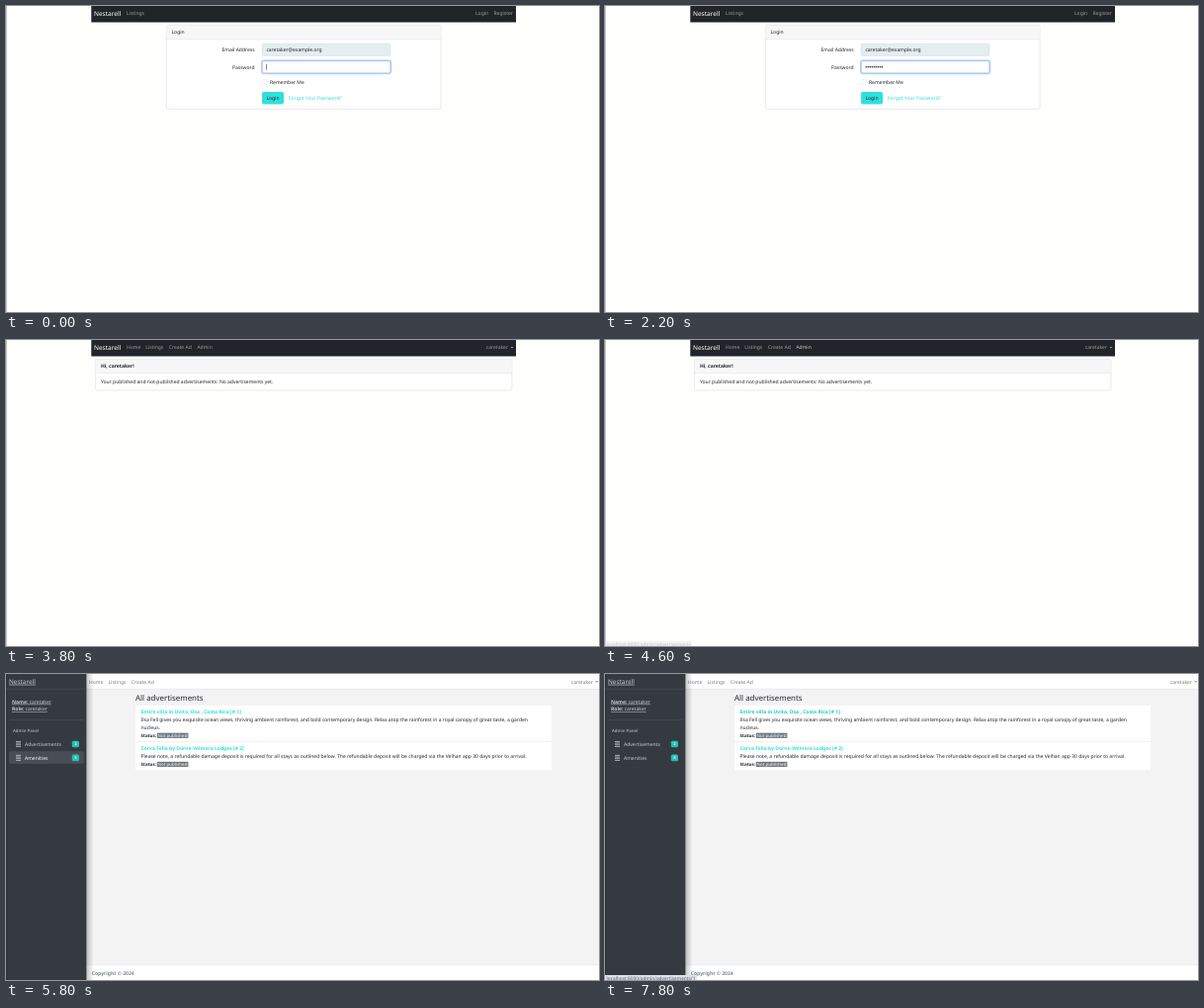
These frames come from a looping animation (600 by 310 pixels, 8000 ms). An HTML page:

```html
<!DOCTYPE html>
<html lang="en">
<head>
<meta charset="utf-8">
<title>Flat listings admin</title>
<style>
  html, body { margin: 0; width: 100%; height: 100%; overflow: hidden; background: #fefefd; }
  svg { display: block; width: 600px; height: 310px; }
  text { font: 5px "Noto Sans", "Open Sans", sans-serif; fill: #212529; text-rendering: geometricPrecision; white-space: pre; }
  .bold { font-weight: 700; }
  .mid { font-weight: 500; }
  .line { text-decoration: underline; }
</style>
</head>
<body>
<svg id="stage" viewBox="0 0 600 310"></svg>
<script>
const LOOP = 8000;
const BRAND = 'Nestarell', USER = 'caretaker';
const CYAN = '#2fe0dd', SIDE = '#c9cdd1';

const rect = (x, y, w, h, fill, more = '') =>
  `<rect x="${x}" y="${y}" width="${w}" height="${h}" fill="${fill}" ${more}/>`;

function text(x, y, str, { fill = '#212529', size = 5, cls = '', end = false } = {}) {
  return `<text x="${x}" y="${y}" class="${cls}" text-anchor="${end ? 'end' : 'start'}" ` +
    `style="fill:${fill};font-size:${size}px">${str}</text>`;
}

const caret = (x, y, fill) => `<path d="M${x - 1.5} ${y}h3l-1.5 1.6z" fill="${fill}"/>`;

function card(x, y, w, h) {
  return rect(x, y, w, h, '#fff', 'rx="1.8" stroke="#dcdcdc" stroke-width=".6"') +
    rect(x + .3, y + .3, w - .6, 13.4, '#f7f7f7', 'rx="1.4"') +
    rect(x, y + 13.7, w, .5, '#dcdcdc');
}

function statusBar(path, opacity = 1) {
  const w = 3 + path.length * 2.43;
  return `<g opacity="${opacity}">` + rect(0, 305, w, 5, '#dfe2ea') +
    text(1.5, 310.2, path, { size: 4.8, fill: '#555a66' }) + '</g>';
}

function darkNav(links) {
  return rect(0, 0, 600, 310, '#fefefd') + rect(0, 0, .8, 310, '#b4b4b4') +
    rect(86.3, 0, 429.7, 16.5, '#212529') +
    text(89, 10, BRAND, { size: 6.5, fill: '#fff' }) +
    links.map(([x, s, lit]) => text(x, 9.3, s, { fill: lit ? '#cfd1d2' : '#9b9d9f' })).join('');
}

function loginPage({ dots, cursor, pressed }) {
  const ring = (x, y, w, h, c) =>
    rect(x, y, w, h, 'none', `rx="2.4" stroke="${c}" stroke-width="1.4"`);
  let out = darkNav([[122, 'Listings'], [475, 'Login'], [493.5, 'Register']]) +
    card(162.3, 19.4, 277.7, 85) +
    text(167.5, 28, 'Login') +
    text(251.6, 46, 'Email Address', { end: true }) +
    rect(259.2, 38.2, 129.8, 12.2, '#e4edef', 'rx="1.6" stroke="#d0d8dc" stroke-width=".5"') +
    text(263.4, 46, USER + '@example.org') +
    text(251.6, 63.6, 'Password', { end: true });
  if (!pressed) out += ring(258.6, 55, 131, 13.6, '#c5dcf8');
  out += rect(259.2, 55.6, 129.8, 12.4, '#fff',
    `rx="1.6" stroke="${pressed ? '#ced4da' : '#78aee8'}" stroke-width=".7"`);
  for (let i = 0; i < dots; i++)
    out += `<circle cx="${264.3 + i * 2}" cy="61.8" r=".8" fill="#212529"/>`;
  if (cursor) out += rect(263.4 + dots * 2, 58.8, .6, 6, '#333');
  out += rect(259.4, 74.5, 5, 5, '#fff', 'rx="1" stroke="#e2e2e2" stroke-width=".5"') +
    text(267, 79, 'Remember Me');
  if (pressed) out += ring(258.6, 86.4, 23, 13.6, '#a9ece9');
  return out + rect(259, 86.9, 22, 12.5, pressed ? '#27cfca' : CYAN, 'rx="1.8"') +
    text(263.4, 95, 'Login') +
    text(286, 95, 'Forgot Your Password?', { fill: '#36d9dc' });
}

function homePage({ hover, status }) {
  return darkNav([[122, 'Home'], [141.3, 'Listings'], [164.8, 'Create Ad'], [193.4, 'Admin', hover]]) +
    text(508, 9.3, USER, { fill: '#9b9d9f', end: true }) + caret(512, 7, '#9b9d9f') +
    card(90.4, 19.4, 421.5, 31.6) +
    text(96, 28, `Hi, ${USER}!`, { cls: 'bold' }) +
    text(96, 44, 'Your published and not-published advertisements: No advertisements yet.') +
    (status ? statusBar('localhost:8000/admin/advertisements', .35) : '');
}

function menuItem(y, label, count, lit) {
  const bars = [0, 1.7, 3.4, 5.1].map(d => rect(10, y - 4.6 + d, 5, .8, '#bfc4c9')).join('');
  return (lit ? rect(3, y - 8.2, 75.8, 12.6, '#494e54', 'rx="1.6"') : '') + bars +
    text(19, y, label, { fill: lit ? '#fff' : SIDE }) +
    rect(66.8, y - 4.9, 7.2, 6.6, '#25c0b4', 'rx="1.5"') +
    text(69.4, y - .2, count, { size: 3.7, fill: '#fff', cls: 'bold' });
}

function sideBar(hover) {
  const pair = (y, key) => text(6, y,
    `<tspan class="bold">${key}:</tspan> ${USER}`, { fill: SIDE, cls: 'line' });
  return rect(81.5, 0, 7, 310, 'url(#shade)') +
    rect(0, 0, 81.5, 310, '#343a40') + rect(0, 0, .8, 310, '#292d31') +
    text(3, 9.7, BRAND, { size: 6.4, fill: SIDE, cls: 'line' }) +
    rect(0, 14.9, 81.5, .5, '#4b545c') +
    pair(29.6, 'Name') + pair(37.3, 'Role') +
    rect(4, 46, 74, .5, '#4f5962') +
    text(7, 59.2, 'Admin Panel', { size: 4.4, fill: SIDE }) +
    menuItem(72.6, 'Advertisements', 2, hover === 'ads') +
    menuItem(86.5, 'Amenities', 5, hover === 'amenities');
}

function advert(y, title, lines, lit) {
  const foot = y + 7.6 + lines.length * 7.9;
  return text(136.5, y, title, { fill: lit ? '#23c9c6' : CYAN, cls: 'bold' }) +
    lines.map((s, i) => text(136.5, y + 7.5 + i * 7.9, s)).join('') +
    text(136.5, foot, 'Status:', { size: 4.5, cls: 'bold' }) +
    rect(152.8, foot - 4, 31.6, 5.2, '#6c757d') +
    text(153.6, foot, 'Not published', { size: 4.5, fill: '#fff' });
}

function advertList(lit) {
  return rect(131, 32, 421, 65.4, '#fff') + rect(131, 68.3, 421, .5, '#e2e2e2') +
    advert(40.3, 'Entire villa in Uvita, Osa , Costa Rica [# 1]', [
      'Ilsa Fell gives you exquisite ocean views, thriving ambient rainforest, and bold contemporary design. ' +
      'Relax atop the rainforest in a royal canopy of great taste, a garden',
      'nucleus.'], lit) +
    advert(77.4, 'Corva Tella by Dorne Velmora Lodges [# 2]', [
      'Please note, a refundable damage deposit is required for all stays as outlined below. ' +
      'The refundable deposit will be charged via the Velhan app 30 days prior to arrival.']);
}

function amenityList() {
  const names = ['towels', 'sofa', 'air conditioning', 'tables', 'shower'];
  return rect(131, 32, 421, 67.4, '#fff') + names.map((s, i) =>
    (i ? rect(131, 31.4 + i * 13.6, 421, .5, '#e2e2e2') : '') +
    text(136.5, 40.2 + i * 13.6, s, { cls: 'bold' })).join('');
}

function adminPage({ list, hover, status, lit }) {
  const grey = '#7d7f81', ads = list === 'ads';
  return `<linearGradient id="shade"><stop stop-color="#000" stop-opacity=".22"/>` +
    `<stop offset="1" stop-color="#000" stop-opacity="0"/></linearGradient>` +
    rect(0, 0, 600, 310, '#f3f3f4') +
    rect(81, 0, 519, 15, '#fefefe') + rect(81, 14.9, 519, .5, '#dee2e6') +
    [[84, 'Home'], [103.5, 'Listings'], [126.8, 'Create Ad']].map(([x, s]) => text(x, 9.5, s, { fill: grey })).join('') +
    text(594, 9.5, USER, { fill: grey, end: true }) + caret(597.7, 7.2, grey) +
    text(131, 26.6, ads ? 'All advertisements' : 'All available amenities', { size: 7.9, cls: 'mid' }) +
    (ads ? advertList(lit) : amenityList()) +
    rect(81, 294.5, 519, 15.5, '#fefefe') + rect(81, 294.3, 519, .5, '#dee2e6') +
    text(86.8, 305, 'Copyright © 2024', { fill: '#7f878e', cls: 'bold' }) +
    sideBar(hover) + (status ? statusBar('localhost:8000/admin/' + status) : '');
}

// [start in ms, page, state]
const steps = [
  [0, loginPage, { dots: 0, cursor: true }],
  [800, loginPage, { dots: 1 }],
  [1000, loginPage, { dots: 2 }],
  [1200, loginPage, { dots: 3 }],
  [1400, loginPage, { dots: 5 }],
  [1600, loginPage, { dots: 7 }],
  [1800, loginPage, { dots: 9 }],
  [2400, loginPage, { dots: 9, pressed: true }],
  [3000, homePage, {}],
  [4200, homePage, { hover: true }],
  [4400, homePage, { hover: true, status: true }],
  [4800, adminPage, { list: 'ads' }],
  [5600, adminPage, { list: 'ads', hover: 'amenities' }],
  [6000, adminPage, { list: 'ads', hover: 'amenities', status: 'amenities' }],
  [6200, adminPage, { list: 'amenities', hover: 'amenities', status: 'amenities' }],
  [6600, adminPage, { list: 'amenities', hover: 'ads', status: 'advertisements' }],
  [7000, adminPage, { list: 'ads', hover: 'ads', status: 'advertisements' }],
  [7400, adminPage, { list: 'ads' }],
  [7600, adminPage, { list: 'ads', status: 'advertisements/1', lit: true }],
];

const stage = document.getElementById('stage');
let shown = null;
function draw() {
  const t = performance.now() % LOOP;
  const step = steps.findLast(s => s[0] <= t);
  if (step !== shown) {
    shown = step;
    stage.innerHTML = step[1](step[2]);
  }
  requestAnimationFrame(draw);
}
draw();
</script>
</body>
</html>
```
